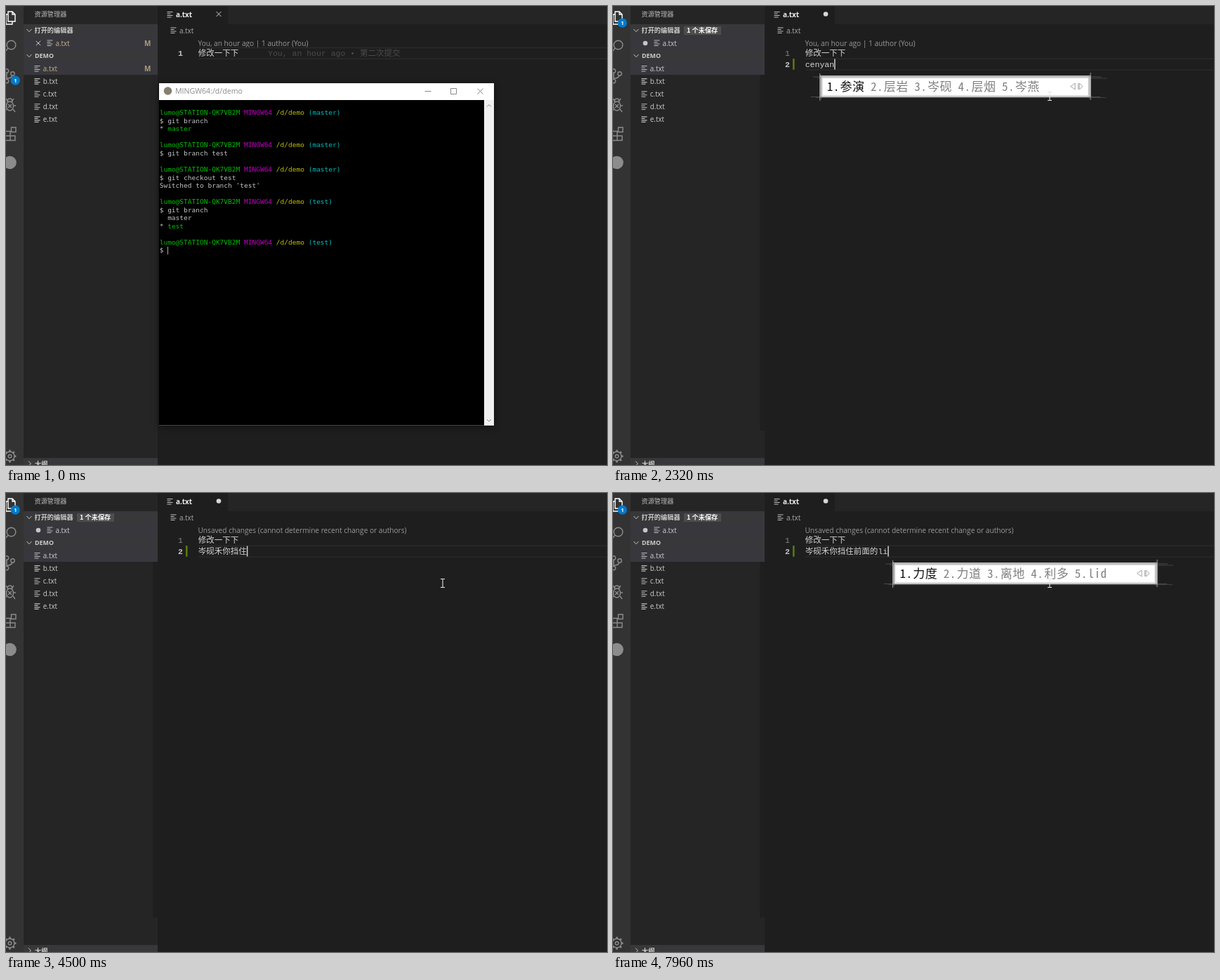
Animation, 856 px wide and 654 px high, one loop 8 s. Source, as an HTML page:

```html
<!DOCTYPE html>
<html lang="zh-CN">
<head>
<meta charset="utf-8">
<title>Editor</title>
<style>
  html, body { margin: 0; width: 100%; height: 100%; overflow: hidden; background: #1e1e1e; }
  svg { display: block; }
  text { white-space: pre; }
  .ui { font: 9.9px "Open Sans", "Noto Sans CJK SC", "Noto Sans CJK", sans-serif; fill: #ccc; }
  .lens { font-size: 10.15px; fill: #999; }
  .title { font-size: 10.6px; fill: #8c8c8c; }
  .head { font-size: 8.9px; }
  .count { font-size: 7.5px; fill: #fff; }
  .cn { font: 9.2px "Noto Sans CJK SC", "Noto Sans CJK", sans-serif; fill: #ccc; }
  .b { font-weight: 700; }
  .code { font: 11.5px "Liberation Mono", "Noto Sans CJK SC", "Noto Sans CJK", monospace; fill: #d4d4d4; }
  .code.b { font-weight: 700; }
  .term { font: 9.53px "DejaVu Sans Mono", monospace; fill: #c4c4c4; }
  .ime { font: 17px "Noto Sans Mono CJK SC", "Noto Sans CJK SC", "Noto Sans CJK", monospace; letter-spacing: .5px; }
  .icon { fill: none; stroke: #8c8c8c; stroke-width: 1.4; }
</style>
</head>
<body>
<script>
const LOOP = 8000, LEFT = 273.7, CJK = 11.53, LATIN = 6.9;

const rect = (x, y, w, h, fill, more = '') =>
  `<rect x="${x}" y="${y}" width="${w}" height="${h}" fill="${fill}" ${more}/>`;
const text = (x, y, s, cls, fill, id) =>
  `<text x="${x}" y="${y}" class="${cls}" ${fill ? `style="fill:${fill}"` : ''} ${id ? `id="${id}"` : ''}>${s}</text>`;
const path = (d, stroke, w = 1) => `<path d="${d}" fill="none" stroke="${stroke}" stroke-width="${w}"/>`;
const dot = (x, y, r, fill) => `<circle cx="${x}" cy="${y}" r="${r}" fill="${fill}"/>`;
const group = (id, s) => `<g id="${id}">${s}</g>`;
const cross = (x, y, r, c) => path(`M${x - r} ${y - r}l${2 * r} ${2 * r}m0 ${-2 * r}l${-2 * r} ${2 * r}`, c);
const lines = (x, y) => path(`M${x} ${y - 4}h8m-8 2.5h5m-5 2.5h8m-8 2.5h6`, '#bdbdbd', 1.1);
const chevron = (x, y) => path(`M${x - 3.5} ${y - 2}l3.5 3.7l3.5 -3.7`, '#c5c5c5');
const badge = y => dot(13.3, y, 6.6, '#007acc') + text(11.2, y + 2.8, '1', 'ui count b');

function activityBar() {
  let teeth = '';
  for (let i = 0; i < 8; i++) {
    const a = i * Math.PI / 4, c = Math.cos(a), s = Math.sin(a);
    teeth += `M${5.5 + 6.5 * c} ${641.5 + 6.5 * s}L${5.5 + 9 * c} ${641.5 + 9 * s}`;
  }
  return rect(0, 0, 25, 654, '#333') +
    path('M3 8h6l4 4v10h-10zM3 12h-3v14h9v-4M9 8v4h4', '#fff', 1.4) +
    `<g class="icon">
      <circle cx="7.5" cy="55.5" r="6.3"/><path d="M3 60l-5 6"/>
      <circle cx="1" cy="92.5" r="2.7"/><circle cx="9.5" cy="96.5" r="2.7"/><circle cx="1" cy="107" r="2.7"/>
      <path d="M1 95v9M9 99q-1 4 -7 4"/>
      <ellipse cx="5.5" cy="142.5" rx="5" ry="6.5"/>
      <path d="M2 137q0 -5 3.5 -5t3.5 5M0 132l3 4M11 132l-3 4M0 142h-2M11 142h3M1 147l-3 4M10 147l3 4M3 140l5 5m0 -5l-5 5"/>
      <path d="M-1 178.5h7v13h-7M-1 185h14v6.5h-7M7.5 173h6.5v6.5h-6.5z"/>
      <circle cx="5.5" cy="641.5" r="6.5"/><circle cx="5.5" cy="641.5" r="2.3"/><path stroke-width="2.6" d="${teeth}"/>
    </g>` + dot(5.5, 223, 9.3, '#8c8c8c');
}

function sidebar() {
  const files = ['a', 'b', 'c', 'd', 'e'].map((n, i) =>
    lines(40.5, 89.5 + i * 18.1) + text(52.8, 93 + i * 18.1, n + '.txt', 'ui', '', 'file-' + n)).join('');
  return rect(25, 0, 191, 654, '#252526') + rect(25, 26, 191, 18, '#38383a') +
    rect(25, 44, 191, 18, '#37373d') + rect(25, 62, 191, 18, '#38383a') + rect(25, 80, 191, 18, '#37373d') +
    text(40.5, 15, '资源管理器', 'cn', '#bbb') +
    chevron(33, 35) + text(40.5, 38, '打开的编辑器', 'cn b') +
    lines(58.5, 53) + text(70.5, 56.7, 'a.txt', 'ui', '', 'open') +
    chevron(33, 71) + text(41, 74.2, 'DEMO', 'ui head b') +
    files + rect(25, 644, 191, 10, '#38383a') +
    path('M32 648.5l3.5 3.5l-3.5 3.5', '#c5c5c5') + text(41, 656, '大纲', 'cn b');
}

function editor() {
  return rect(216, 0, 640, 26, '#252526') + rect(216, 0, 100, 26, '#1e1e1e') +
    lines(229.5, 12.5) + text(242, 15.7, 'a.txt', 'ui b', '#eee') +
    lines(234.5, 35) + text(247, 38.7, 'a.txt', 'ui', '#a9a9a9') +
    text(273.5, 56.7, '', 'ui lens', '', 'lens') +
    group('row', path('M274 0h582m0 15.7h-582', '#2a2a2a', 1.5)) +
    text(245, 71, '1', 'code', '', 'n1') +
    text(LEFT, 71, '修改一下下', 'code') +
    group('blame', text(373, 71, 'You, an hour ago • 第二次提交', 'code', '#4b4b4b')) +
    group('second', text(245, 86.8, '2', 'code b', '#c6c6c6') + rect(256, 75, 2.5, 15.7, '#587c0c') +
      text(LEFT, 87, '', 'code', '', 'done') + text(LEFT, 87, '', 'code', '', 'typing')) +
    rect(0, 0, 1.5, 15, '#d0d0d0', 'id="caret"');
}

function terminal() {
  const span = (s, c) => `<tspan fill="${c}">${s}</tspan>`;
  const prompt = b => span('lumo@STATION-QK7VB2M ', '#00bf00') + span('MINGW64 ', '#bf00bf') +
    span('/d/demo ', '#bfbf00') + span(`(${b})`, '#00bfbf');
  const star = b => '* ' + span(b, '#00bf00');
  const rows = [
    prompt('master'), '$ git branch', star('master'), '',
    prompt('master'), '$ git branch test', '',
    prompt('master'), '$ git checkout test', "Switched to branch 'test'", '',
    prompt('test'), '$ git branch', '  master', star('test'), '',
    prompt('test'), '$ '
  ];
  return rect(218, 110, 477, 487.5, '#fff', 'style="filter:drop-shadow(0 2px 5px rgba(0,0,0,.5))"') +
    rect(218, 134, 463, 463.5, '#000') + rect(681, 134, 14, 463.5, '#f0f0f0') +
    path('M685 143.5l3 -3l3 3M685 589l3 3l3 -3', '#888') +
    dot(230.5, 121, 5.8, '#85806f') + text(241, 125, 'MINGW64:/d/demo', 'ui title') +
    path('M596.5 121.5h9M633.5 117.5h8v8h-8z', '#888') + cross(675.5, 121.5, 4, '#888') +
    rows.map((s, i) => text(218.7, 155.3 + i * 11.53, s, 'term')).join('') +
    rect(230, 343, 1, 11, '#aaa');
}

// time, committed text, letters being typed, suggestions
const name = '岑砚禾';
const STEPS = [
  [1320, '', '', ''],
  [1720, '', '', '从 成 侧 才 出'],
  [1780, '', 'c', '从 成 侧 才 出'],
  [1870, '', 'ce', '测 册 侧 策 厕'],
  [1960, '', 'cen', '岑 涔 参 层 曾'],
  [2060, '', 'ceny', '参与 层 岑 参 涔'],
  [2180, '', 'cenya', '参演 层压 岑 参 涔'],
  [2320, '', 'cenyan', '参演 层岩 岑砚 层烟 岑燕'],
  [2550, '', 'cenyanh', '岑砚禾 层岩盒 参演和 参演 岑'],
  [2630, '', 'cenyanhe', '岑砚禾 层岩盒 参演和 参演 岑'],
  [3030, name, '', ''],
  [3150, name, 'n', '你 年 能 那 呢'],
  [3260, name, 'ni', '你 呢 泥 拟 尼'],
  [3580, name, 'nid', '你的 你到 你都 你 泥'],
  [3680, name, 'nida', '你打 你大 你达 你 泥'],
  [3780, name, 'nidan', '你单 你但 你蛋 你 泥'],
  [3880, name, 'nidang', '你当 你挡 你党 你 泥'],
  [3990, name, 'nidangz', '你当作 你挡住 你当众 你当 你'],
  [4090, name, 'nidangzh', '你挡住 你当众 你当真 你挡 你'],
  [4190, name, 'nidangzhu', '你挡住 你当主 你挡 你当 泥的'],
  [4500, name + '你挡住', '', ''],
  [4670, name + '你挡住', 'q', '去 前 起 请 其'],
  [4745, name + '你挡住', 'qi', '起 其 气 期 七'],
  [4820, name + '你挡住', 'qia', '恰 卡 掐 洽 前'],
  [4895, name + '你挡住', 'qian', '前 钱 千 签 欠'],
  [4970, name + '你挡住', 'qiand', '前端 前段 签到 前道 前导师'],
  [5280, name + '你挡住前端', '', ''],
  [5740, name + '你挡住前', '', ''],
  [6160, name + '你挡住前', 'm', '吗 么 没 们 面'],
  [6260, name + '你挡住前', 'mi', '米 密 迷 秘 蜜'],
  [6360, name + '你挡住前', 'mia', '面 面条 棉花 面包 免费'],
  [6470, name + '你挡住前', 'mian', '面 免 棉 眠 勉'],
  [6770, name + '你挡住前面', '', ''],
  [6920, name + '你挡住前面', 'd', '的 到 都 大 对'],
  [7080, name + '你挡住前面', 'de', '的 得 德 地 嘚'],
  [7270, name + '你挡住前面的', '', ''],
  [7560, name + '你挡住前面的', '', '了 来 里 两 老'],
  [7760, name + '你挡住前面的', 'l', '里 力 理 离 利'],
  [7960, name + '你挡住前面的', 'li', '力度 力道 离地 利多 lid']
];

function suggestions(words, x, y) {
  const cell = 8.9;
  let pos = x + 9, items = '';
  words.split(' ').forEach((w, i) => {
    const color = i ? '#808080' : '#111';
    items += text(pos, y + 22.3, `${i + 1}.`, 'ime', color) + text(pos + 2 * cell + 1, y + 22, w, 'ime', color);
    pos += cell * (3 + w.length * (/[a-z]/.test(w) ? 1 : 2));
  });
  const r = pos + 65;
  return rect(x - 1, y, r - x, 32, '#ececec') + rect(x + 2, y + 3, r - x - 6, 26, '#fff') +
    path(`M${x} ${y + 1}H${r - 1}V${y + 31}H${x}z`, '#8a8a8a', .9) +
    path(`M${x + 2.5} ${y + 3.5}H${r - 4}V${y + 28.5}H${x + 2.5}z`, '#b8b8b8', .6) +
    path(`M${x - 11} ${y + 2}H${r + 14}M${x - 14} ${y + 30.5}H${r + 13}`, '#777', .5) +
    path(`M${x - 5} ${y + 4}H${x}M${r} ${y + 4}h22M${x - 7} ${y + 31.5}H${r + 21}`, '#484848', .8) +
    path(`M${x - 1} ${y - 3}V${y + 36}M${r - 1} ${y - 4}V${y + 35}`, '#aaa', .9) +
    path(`M${x + 1} ${y - 1}V${y + 34}M${r - 3} ${y - 1}V${y + 33}`, '#777', .6) + items +
    path(`M${r - 23} ${y + 11}v9l-6.5 -4.5zM${r - 18.5} ${y + 11}v9M${r - 17} ${y + 11}v9l5 -4.5z`, '#999', .9);
}

document.body.innerHTML = '<svg width="856" height="654" viewBox="0 0 856 654">' +
  rect(0, 0, 856, 654, '#1e1e1e') + activityBar() + sidebar() + editor() +
  group('clean', cross(46, 53, 3.2, '#ccc') + cross(303, 11.5, 3.5, '#ccc') +
    text(197, 56.7, 'M', 'ui b', '#b59d75') + text(197, 93, 'M', 'ui b', '#b59d75')) +
  group('dirty', dot(46, 53, 3.3, '#c5c5c5') + dot(303, 11.5, 3.3, '#d8d8d8') + badge(24) +
    rect(101, 29, 53, 12, '#4d4d4d') + text(105, 38, '1 个未保存', 'cn b', '#fff')) +
  group('scm', badge(106)) +
  group('edge', rect(209, 98, 7, 507, '#1f1f1f')) +
  group('term', terminal()) + group('ime', '') +
  group('beam', path('M-3 -6h2.5l.5 .5l.5 -.5h2.5M0 -5.5v11M-3 6h2.5l.5 -.5l.5 .5h2.5', '#e4e4e4', 1.1)) +
  group('arrow', '<path d="M0 0v12l2.8 -2.6l2 4.6l1.8 -.8l-2 -4.5h3.8z" fill="#fff" stroke="#222" stroke-width=".8"/>') +
  '</svg>';

const $ = id => document.getElementById(id);
const show = (id, on) => { $(id).style.display = on ? '' : 'none'; };
const clamp = v => Math.max(0, Math.min(1, v));
const ease = v => v * v * (3 - 2 * v);
let last = '';

function pointer(t) {
  const a = ease(clamp((t - 70) / 380)), b = ease(clamp((t - 560) / 340));
  const x = 794 - 193 * a + 21 * b, y = 172 - 51 * a + 7.5 * b;
  const over = t < 530 && x < 695;
  show('beam', t >= 70 && !over);
  show('arrow', t >= 70 && over);
  for (const id of ['beam', 'arrow']) $(id).setAttribute('transform', `translate(${x} ${y})`);
}

function draw(t) {
  pointer(t);
  const hidden = t >= 530, edited = t >= 1320;
  const step = STEPS.filter(s => s[0] <= t).pop();
  const key = [hidden, edited, step && step[0]].join();
  if (key === last) return;
  last = key;

  for (const id of ['term', 'scm']) show(id, !hidden);
  for (const id of ['edge', 'caret']) show(id, hidden);
  for (const id of ['clean', 'blame']) show(id, !edited);
  for (const id of ['dirty', 'second']) show(id, edited);
  for (const id of ['open', 'file-a']) $(id).style.fill = edited ? '#ccc' : '#c9ae82';
  $('n1').style.fill = edited ? '#858585' : '#c6c6c6';
  $('n1').style.fontWeight = edited ? 400 : 700;
  $('row').setAttribute('transform', `translate(0 ${edited ? 75.3 : 59.6})`);
  $('lens').textContent = t >= 2630 ? 'Unsaved changes (cannot determine recent change or authors)'
    : 'You, an hour ago | 1 author (You)';

  const [, done, typing, words] = step || [0, '', '', ''];
  const start = LEFT + done.length * CJK;
  $('done').textContent = done;
  $('typing').textContent = typing;
  $('typing').setAttribute('x', start);
  $('caret').setAttribute('x', edited ? start + typing.length * LATIN : LEFT + 5 * CJK);
  $('caret').setAttribute('y', edited ? 75.5 : 60);
  $('ime').innerHTML = !words ? '' : typing ? suggestions(words, start + 22, 99) : suggestions(words, start + 17, 84);
}

const begin = performance.now();
function tick() {
  draw((performance.now() - begin) % LOOP);
  requestAnimationFrame(tick);
}
tick();
</script>
</body>
</html>
```
